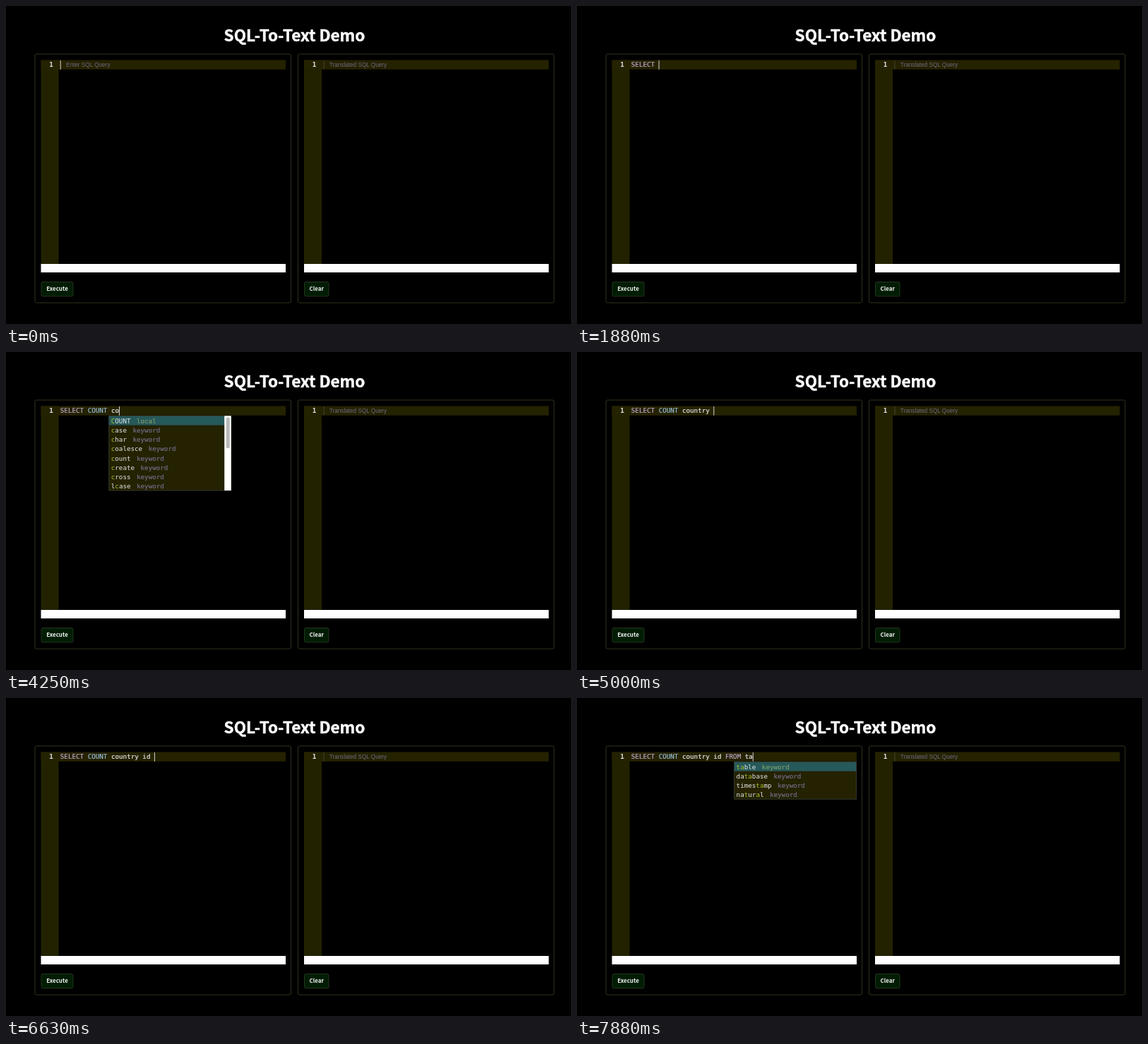
Recreate the animation shown at these times as an HTML page. Size 800x450 px, loop 8000 ms.

```html
<!DOCTYPE html>
<html lang="en">
<head>
<meta charset="utf-8">
<title>SQL-To-Text Demo</title>
<style>
  html, body { margin: 0; width: 100%; height: 100%; overflow: hidden; background: #000; }
  svg { display: block; width: 800px; height: 450px; }
  text { white-space: pre; }
  .title, .btn { font-family: "Noto Sans CJK JP", "Noto Sans CJK SC", "Open Sans", sans-serif; font-weight: 700; fill: #fff; text-anchor: middle; }
  .title { font-size: 22.5px; stroke: #fff; stroke-width: 0.5px; }
  .btn { font-size: 8px; fill: #f2f2f2; }
  .hint { font: 8.2px "Liberation Sans", Arial, sans-serif; fill: #6f6780; }
  .code { font: 9.22px "DejaVu Sans Mono", monospace; fill: #e6e6ea; stroke-width: 0.2px; }
  .num { font-weight: 700; fill: #e4e4e4; text-anchor: middle; }
</style>
</head>
<body>
<svg viewBox="0 0 800 450" xmlns="http://www.w3.org/2000/svg">
  <rect width="800" height="450" fill="#000"/>
  <text class="title" x="408.5" y="49.6">SQL-To-Text Demo</text>
  <g id="panels"></g>
  <g id="line" stroke="#e6e6ea" stroke-width="0"></g>
  <g id="popup"></g>
</svg>
<script>
const LOOP = 8000, STEP = 125;
const CHAR = 5.55, LEFT = 76.8, BASE = 86.4, ROW = 13.2, TOP = 90.4, WIDTH = 173;
const SCRIPT = "SELECT COUNT country id FROM ta";

// Step at which each character of SCRIPT is typed
const KEYS = [
  1, 2, 3, 4, 5, 6, 7,
  16, 18, 20, 21, 23, 24,
  33, 34, 35, 36, 37, 38, 39, 40,
  47, 49, 50,
  55, 56, 57, 58, 59,
  61, 62
];
// Steps during which the caret is blinked off
const CARET_OFF = [12, 13, 28, 29, 44, 45, 46, 54];

const KEYWORDS = ("select insert update delete from where and or group by order limit offset " +
  "having as case when then else end type left right join on outer desc asc union create table " +
  "primary key if foreign not references default null inner cross natural database drop grant " +
  "true false avg count first last max min sum ucase lcase mid len round rank now format coalesce " +
  "ifnull isnull nvl int numeric decimal date varchar char bigint float double bit binary text set " +
  "timestamp money real number integer").split(" ");

const TOKEN_COLORS = { SELECT: "#bcaacb", FROM: "#bcaacb", COUNT: "#97bcd8" };

const $ = id => document.getElementById(id);
const rect = (x, y, w, h, fill, extra = "") =>
  `<rect x="${x}" y="${y}" width="${w}" height="${h}" fill="${fill}" ${extra}/>`;
const text = (cls, x, y, body, fill) =>
  `<text class="${cls}" x="${x}" y="${y}"${fill ? ` style="fill:${fill};stroke:${fill}"` : ""}>${body}</text>`;

function panel(x, label, width) {
  return rect(x, 68, 362.5, 352, "none", 'rx="2" stroke="#30321a"') +
    rect(x + 8.5, 76.5, 25, 289, "#222200") +
    rect(x + 8.5, 76.5, 346.5, 13.3, "#252200") +
    rect(x + 8.5, 365, 346.5, 12, "#fff") +
    text("code num", x + 23, BASE, "1") +
    rect(x + 9, 390.5, width, 20.3, "#001d04", 'rx="2" stroke="#25341f"') +
    text("btn", x + 9 + width / 2, 403.4, label);
}

$("panels").innerHTML = panel(41, "Execute", 45) + panel(413.5, "Clear", 34.5) +
  rect(449.5, 77, 1, 12.5, "#45432f") +
  text("hint", 457.8, 86.2, "Translated SQL Query");

const typed = step => SCRIPT.slice(0, KEYS.filter(k => k <= step).length);
const lastWord = s => s.slice(s.lastIndexOf(" ") + 1);

// Positions of the matched letters: a contiguous run if there is one, otherwise in order
function match(name, query) {
  const low = name.toLowerCase(), q = query.toLowerCase();
  const at = low.indexOf(q);
  if (at >= 0) return { rank: at, hits: [...q].map((c, i) => at + i) };
  const hits = [];
  let pos = -1;
  for (const c of q) {
    pos = low.indexOf(c, pos + 1);
    if (pos < 0) return null;
    hits.push(pos);
  }
  return { rank: 99, hits };
}

function suggest(before, query) {
  const locals = [...new Set(before.split(" ").filter(Boolean))];
  const items = [
    ...locals.map(name => ({ name, meta: "local" })),
    ...KEYWORDS.map(name => ({ name, meta: "keyword" }))
  ];
  return items
    .map(item => ({ ...item, ...(match(item.name, query) || { rank: -1 }) }))
    .filter(item => item.rank >= 0)
    .sort((a, b) => a.rank - b.rank || (a.name < b.name ? -1 : 1));
}

function drawLine(s, step) {
  let out = s ? "" : `<g stroke="none">${text("hint", 85, 86.2, "Enter SQL Query")}</g>`;
  let col = 0;
  for (const word of s.split(" ")) {
    if (word) out += text("code", LEFT + col * CHAR, BASE, word, TOKEN_COLORS[word]);
    col += word.length + 1;
  }
  if (!CARET_OFF.includes(step))
    out += rect(LEFT + s.length * CHAR - 0.1, 77, 1, 12.8, "#d4d4d0");
  return out;
}

function drawPopup(s, step) {
  const word = lastWord(s), earlier = lastWord(typed(step - 1));
  if (!word || !earlier) return "";
  const query = earlier.length < 2 ? earlier : word;
  const before = s.slice(0, s.length - word.length);
  const items = suggest(before, query);
  if (!items.length) return "";
  if (items.length === 1 && items[0].name === query.toLowerCase()) return "";

  const shown = items.slice(0, 8);
  const x = Math.min(LEFT + before.length * CHAR - 3.2, 222.6);
  const h = shown.length * ROW;
  let out = rect(x, TOP, WIDTH, h, "#242200") +
    rect(x, TOP, WIDTH, ROW, "#26595a") +
    rect(x, TOP, WIDTH, h, "none", 'stroke="#3a4038" stroke-width="0.8"');
  shown.forEach((item, i) => {
    const y = TOP + i * ROW + 10.3;
    const name = [...item.name].map((c, k) =>
      item.hits.includes(k) ? `<tspan fill="#a9c22c">${c}</tspan>` : c).join("");
    out += text("code", x + 3, y, name) +
      text("code", x + 11.5 + item.name.length * CHAR, y, item.meta, i ? "#736b88" : "#7c9a68");
  });
  if (items.length > 8)
    out += rect(x + WIDTH - 9.5, TOP, 9.5, h, "#fff") +
      rect(x + WIDTH - 7, TOP + 2, 5, 93 * 8 / items.length, "#b9b9b9", 'rx="2.5"');
  return out;
}

let drawn = -1;
function render(ms) {
  const step = Math.floor((ms % LOOP) / STEP);
  if (step !== drawn) {
    drawn = step;
    const s = typed(step);
    $("line").innerHTML = drawLine(s, step);
    $("popup").innerHTML = drawPopup(s, step);
  }
}

const start = performance.now();
function tick() {
  render(performance.now() - start);
  requestAnimationFrame(tick);
}
tick();
</script>
</body>
</html>
```
